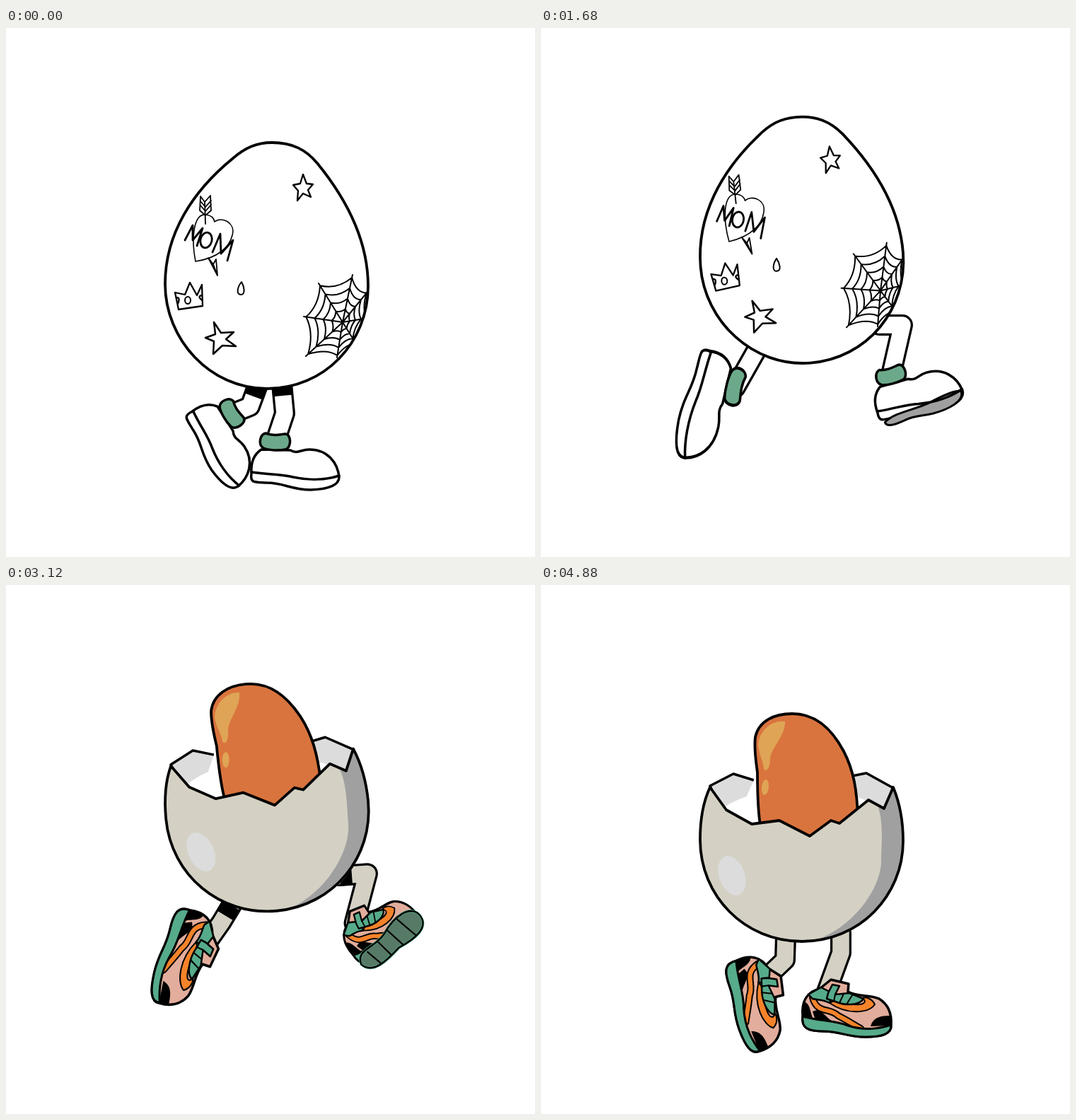
Animation of 748 by 748 pixels, one loop 4.92 s. Source, as an HTML page with a canvas:

```html
<!DOCTYPE html>
<html lang="en">
<head>
<meta charset="utf-8">
<title>Running egg</title>
<style>
  html, body { margin: 0; width: 100%; height: 100%; overflow: hidden; background: #fff; }
  canvas { display: block; width: 100vmin; height: 100vmin; }
</style>
</head>
<body>
<canvas width="748" height="748"></canvas>
<script>
const ctx = document.querySelector('canvas').getContext('2d');
const LOOP = 4920, STEP = LOOP / 4, TICK = 40;
const INK = '#000', SHELL = '#d4d1c4', PALE = '#dcdcdc', GREY = '#a0a0a0';
const GREEN = '#56ab8b', PINK = '#e2ad9c', ORANGE = '#f5832a';

// Body per step: time, lowest point, tilt in degrees
const BODY = [
  [0, 510, 0], [90, 513, .5], [180, 510, .7], [450, 474, -4.5], [630, 461.5, -5.4],
  [1010, 461, -4.6], [1120, 482, -4.2], [1140, 504, 0], [1190, 504, 0]
];
// One leg over two steps: hip, knee, ankle, foot angle, foot length, visible sole
const LEG_TIMES = [0, 180, 450, 630, 1120, 1140, 1190];
const LEG = [
  [390, 503, 394, 545, 381, 584, 0, 1, 0],
  [342, 500, 341, 532, 321, 548, 54, 1, 0],
  [305, 455, 292, 478, 275, 508, 102, 1.25, 0],
  [318, 453, 303, 477, 285, 504, 103, 1.1, 0],
  [328, 470, 322, 508, 289, 524, 77, 1.12, 0],
  [340, 495, 335, 517, 308, 538, 63, 1, 0],
  [346, 497, 345, 530, 321, 553, 70, 1.05, 0],
  [356, 505, 345, 535, 320, 545, 56, 1, 0],
  [440, 485, 446, 515, 404, 552, 52, 1, 0],
  [478, 420, 511, 420, 495, 490, -17, 1, 1],
  [472, 411, 511, 408, 493, 478, -38, .85, 1],
  [474, 433, 507, 445, 481, 498, -3, 1, .6],
  [415, 494, 424, 530, 406, 577, 0, 1, 0],
  [424, 492, 424, 520, 404, 575, 0, 1, 0]
];

// Smooth looping interpolation without overshoot
function sample(times, keys, period, t) {
  const n = times.length;
  const wrap = j => (j + n) % n;
  const time = j => times[wrap(j)] + period * Math.floor(j / n);
  let i = n - 1;
  while (times[i] > t) i--;
  const span = time(i + 1) - time(i), u = (t - time(i)) / span;
  return keys[0].map((_, c) => {
    const value = j => keys[wrap(j)][c];
    const rise = j => (value(j + 1) - value(j)) / (time(j + 1) - time(j));
    const slope = j => {
      const a = rise(j - 1), b = rise(j);
      return a * b <= 0 ? 0 : 2 * a * b / (a + b);
    };
    const p = value(i), q = value(i + 1), v = 1 - u;
    return p * v * v * (1 + 2 * u) + q * u * u * (3 - 2 * u)
      + span * u * v * (slope(i) * v - slope(i + 1) * u);
  });
}

function draw(d, fill, width = 0, color = INK) {
  const path = new Path2D(d);
  if (fill) { ctx.fillStyle = fill; ctx.fill(path); }
  if (width) { ctx.lineWidth = width; ctx.strokeStyle = color; ctx.stroke(path); }
}

function oval(x, y, rx, ry, angle, fill, width = 0) {
  ctx.beginPath();
  ctx.ellipse(x, y, rx, ry, angle, 0, 7);
  if (fill) { ctx.fillStyle = fill; ctx.fill(); }
  if (width) { ctx.lineWidth = width; ctx.strokeStyle = INK; ctx.stroke(); }
}

function placed(x, y, degrees, sx, paint) {
  ctx.save();
  ctx.translate(x, y);
  ctx.rotate(degrees * Math.PI / 180);
  ctx.scale(sx, 1);
  paint();
  ctx.restore();
}

function plainShoe(sole) {
  const bottom = 'C-36,60 -30,58 -12,59 C12,59 22,69 50,69 C76,68 90,62 90,51';
  draw('M-20,12 C-32,20 -35,32 -34,46 ' + bottom +
    ' C88,31 74,12 48,12 C35,12 32,19 21,13 Z', '#fff', 3.5);
  if (sole > .05) placed(0, 52, 0, 1, () => {
    ctx.scale(1, sole);
    draw('M-28,10 C-10,0 15,6 40,2 C65,-3 84,-4 88,0 C88,14 64,19 40,18 C20,16 12,13 -4,16 C-20,18 -28,16 -28,10 Z', GREY, 3);
  });
  draw('M-34,44 C-8,48 6,46 25,51 C48,56 72,55 90,49', null, 3.5);
  draw('M-14,-11 C-3,-7 5,-9 13,-10 C23,-11 23,10 14,12 C4,14 -10,13 -17,10 C-25,5 -22,-9 -14,-11 Z', '#6ca98a', 3.5);
}

function sneaker(sole) {
  const under = 'C92,60 78,64 54,64 C28,64 20,56 -4,56 C-26,56 -36,52 -34,35 Z';
  draw('M-34,35 C-36,14 -28,0 -10,-4 L6,-17 L31,-11 L30,0 C45,8 62,4 74,10 C87,18 92,32 91,47 ' + under, PINK, 3.5);
  draw('M-33,14 C-22,16 -24,32 -18,40 L-34,36 Z M-20,28 C-8,22 -4,34 8,42 L-16,40 Z M62,49 C66,36 76,34 91,34 L91,48 Z', INK);
  draw('M-20,8 C-14,32 4,22 16,34 C28,40 34,44 48,52', null, 10);
  draw('M-20,8 C-14,32 4,22 16,34 C28,40 34,44 48,52', null, 6, ORANGE);
  draw('M4,16 C30,34 60,30 68,18 C64,10 56,7 50,9 C64,18 36,24 16,10 Z', ORANGE, 2);
  draw('M-26,4 L-8,-6 L8,2 L4,16 C-6,10 -14,12 -20,10 Z', GREEN, 2.5);
  draw('M2,2 L8,-10 L18,-8 L12,4 L32,2 L52,10 C46,20 26,20 12,14 L0,10 Z', GREEN, 2.5);
  draw('M12,4 L10,14 M24,3 L18,16 M36,5 L28,18', null, 2);
  draw('M-34,35 C-10,42 10,40 30,48 C55,56 75,52 91,47 ' + under, GREEN, 3);
  if (sole > .05) placed(0, 50, 0, 1, () => {
    ctx.scale(1, sole);
    draw('M-33,2 C-24,-20 0,-4 28,-12 C60,-24 92,-22 94,-2 C94,20 64,20 34,16 C6,20 -28,24 -33,2 Z', '#577a66', 4, GREEN);
    draw('M-33,2 C-24,-20 0,-4 28,-12 C60,-24 92,-22 94,-2 C94,20 64,20 34,16 C6,20 -28,24 -33,2 Z M-12,-6 L-6,18 M12,-8 L16,17 M36,-13 L42,16 M60,-17 L68,16', null, 2.5);
  });
}

function leg(t, yolky) {
  const times = [...LEG_TIMES, ...LEG_TIMES.map(k => k + STEP)];
  const [hx, hy, kx, ky, ax, ay, angle, length, sole] = sample(times, LEG, 2 * STEP, t % (2 * STEP));
  const limb = `M${hx},${hy} L${kx},${ky} L${ax},${ay}`;
  draw(limb, null, 30);
  draw(limb, null, 23.5, yolky ? SHELL : '#fff');
  const phase = t % STEP;
  if (phase < 300 || yolky && phase < 1000) {
    const k = 17 / Math.hypot(kx - hx, ky - hy);
    ctx.lineCap = 'butt';
    draw(`M${hx},${hy} l${(kx - hx) * k},${(ky - hy) * k}`, null, 29);
    ctx.lineCap = 'round';
  }
  placed(ax, ay, angle, length, () => (yolky ? sneaker : plainShoe)(sole));
}

function web() {
  const x = 476, y = 416;
  const spokes = [[14, -67], [-34, -55], [-55, -8], [-52, 48], [-8, 50], [20, 32], [36, -6], [36, -44]];
  const rings = [.94, .72, .5, .28];
  let d = '';
  spokes.forEach(([a, b], i) => {
    d += `M${x},${y} l${a},${b}`;
    const [c, e] = spokes[(i + 1) % spokes.length];
    for (const r of rings)
      d += `M${x + a * r},${y + b * r} Q${x + (a + c) * r * .4},${y + (b + e) * r * .4} ${x + c * r},${y + e * r}`;
  });
  draw(d, null, 2);
}

function tattooEgg() {
  const outline = 'M376,162 C405,162 424,172 440,191 C480,240 512,300 512,365 C512,445 450,510 369,510 C288,510 225,440 225,362 C225,290 265,230 320,185 C338,169 355,162 376,162 Z';
  draw(outline, '#fff');
  ctx.save();
  ctx.clip(new Path2D(outline));
  web();
  ctx.restore();
  draw(outline, null, 3.8);
  draw('M420,207 L425,220 L434,221 L427,229 L431,239 L420,234 L412,244 L413,230 L406,222 L416,220 Z', null, 2.3);
  draw('M294,416 L304,431 L322,430 L311,440 L325,450 L306,449 L293,461 L294,443 L282,438 L296,433 Z', null, 2.5);
  draw('M239,374 L244,398 L278,393 L277,363 L270,378 L260,360 L253,377 Z M241,381 q6,0 2,9 M277,378 q-7,1 0,7', null, 2.3);
  oval(257, 385, 4, 5, 0, null, 2);
  draw('M333,359 C326,368 326,377 332,377 C339,377 337,366 333,359 Z', null, 2);
  draw('M268,330 C262,300 264,262 283,264 C291,265 294,269 295,274 C305,266 325,275 320,293 C316,310 300,325 268,330 Z', null, 1.6);
  draw('M253,300 L264,279 L264,300 L278,283 L270,308 M292,317 L303,291 L304,319 L321,300 L313,329', null, 2.8);
  oval(283, 300, 8, 11, .25, null, 2.8);
  draw('M282,277 L281,246 M275,238 L281,246 L289,237 L290,258 L282,265 L274,258 Z M275,245 l7,8 l8,-9 M275,251 l7,8 l8,-9 M286,325 L299,350 L297,327 L293,334 Z M293,334 L299,350', null, 1.8);
}

// Paths given as a start point followed by curve triples
const YOLK = {
  low: [292, 345, 288, 340, 286, 330, 288, 322, 290, 312, 296, 304, 304, 298, 318, 288, 340, 282, 364, 282, 392, 282, 415, 290, 430, 300, 440, 308, 446, 314, 450, 330],
  high: [311, 345, 307, 325, 306, 290, 306, 265, 304, 250, 301, 232, 303, 215, 308, 192, 330, 182, 355, 182, 390, 182, 412, 205, 428, 235, 442, 262, 447, 290, 448, 330]
};
const GLOSS = {
  low: [362, 284, 325, 284, 300, 302, 292, 325, 292, 332, 294, 335, 296, 337, 300, 338, 304, 338, 306, 336, 315, 310, 340, 292, 362, 284],
  high: [345, 193, 325, 190, 308, 208, 307, 226, 309, 242, 314, 248, 315, 260, 318, 264, 322, 262, 324, 250, 322, 232, 346, 215, 345, 193]
};
function morph({ low, high }, m) {
  const p = low.map((v, i) => v + (high[i] - v) * m);
  return `M${p.slice(0, 2)} C${p.slice(2)}`;
}

function yolkEgg(t) {
  const rise = Math.min(1, Math.max(0, (t - 2640) / 280));
  const m = rise * rise * (3 - 2 * rise);
  const phase = t % STEP;
  const air = phase > 630 && phase < 1140 ? Math.sin((phase - 630) / 510 * Math.PI) : 0;
  const hidden = Math.max(0, (2640 - t) / 3);

  draw('M239,284 L272,267 L301,276 L333,252 L372,260 L390,248 L420,274 L460,266 L498,287 L470,360 L270,360 Z', PALE, 3.5);
  oval(368, 340, 125, 52, 0, '#fff');
  if (m > .8) draw('M301,240 L301,276 L291,298 L300,345 L445,340 L440,262 L420,240 Z', '#fff');
  ctx.save();
  ctx.translate(0, hidden - 7 * air * m);
  draw(morph(YOLK, m) + ' L448,372 L311,372 Z', '#d9743e', 3.8);
  draw(morph(GLOSS, m), '#e0a456');
  if (m > .3) oval(317, 286 + 90 * (1 - m), 5, 11, .1, '#e0a456');
  ctx.restore();

  const front = 'M239,286 L262,318 L298,338 L337,333 L380,355 L410,333 L422,337 L463,304 L485,316 L498,286 C508,310 512,335 512,362 C512,440 450,504 369,504 C288,504 225,440 225,360 C225,330 230,305 239,286 Z';
  draw(front, SHELL);
  draw('M475,310 L485,316 L498,286 C508,310 512,335 512,362 C512,430 465,498 388,502 C440,485 481,430 481,390 C482,360 484,330 475,310 Z', GREY);
  oval(270, 411, 18, 29, -.35, PALE);
  draw(front, null, 3.8);
}

function frame(now) {
  const t = Math.floor(now % LOOP / TICK) * TICK;
  const yolky = t >= LOOP / 2;
  const [low, tilt] = sample(BODY.map(k => k[0]), BODY.map(k => k.slice(1)), STEP, t % STEP);
  const base = yolky ? 504 : 510, pivot = base - 150;

  ctx.fillStyle = '#fff';
  ctx.fillRect(0, 0, 748, 748);
  ctx.lineJoin = ctx.lineCap = 'round';
  const legs = [t, t + STEP];
  if (yolky) legs.reverse();
  legs.reverse().forEach(k => leg(k, yolky));
  placed(369, pivot + low - base, tilt, 1, () => {
    ctx.translate(-369, -pivot);
    yolky ? yolkEgg(t) : tattooEgg();
  });
}

const start = performance.now();
(function loop() {
  frame(performance.now() - start);
  requestAnimationFrame(loop);
})();
</script>
</body>
</html>
```
